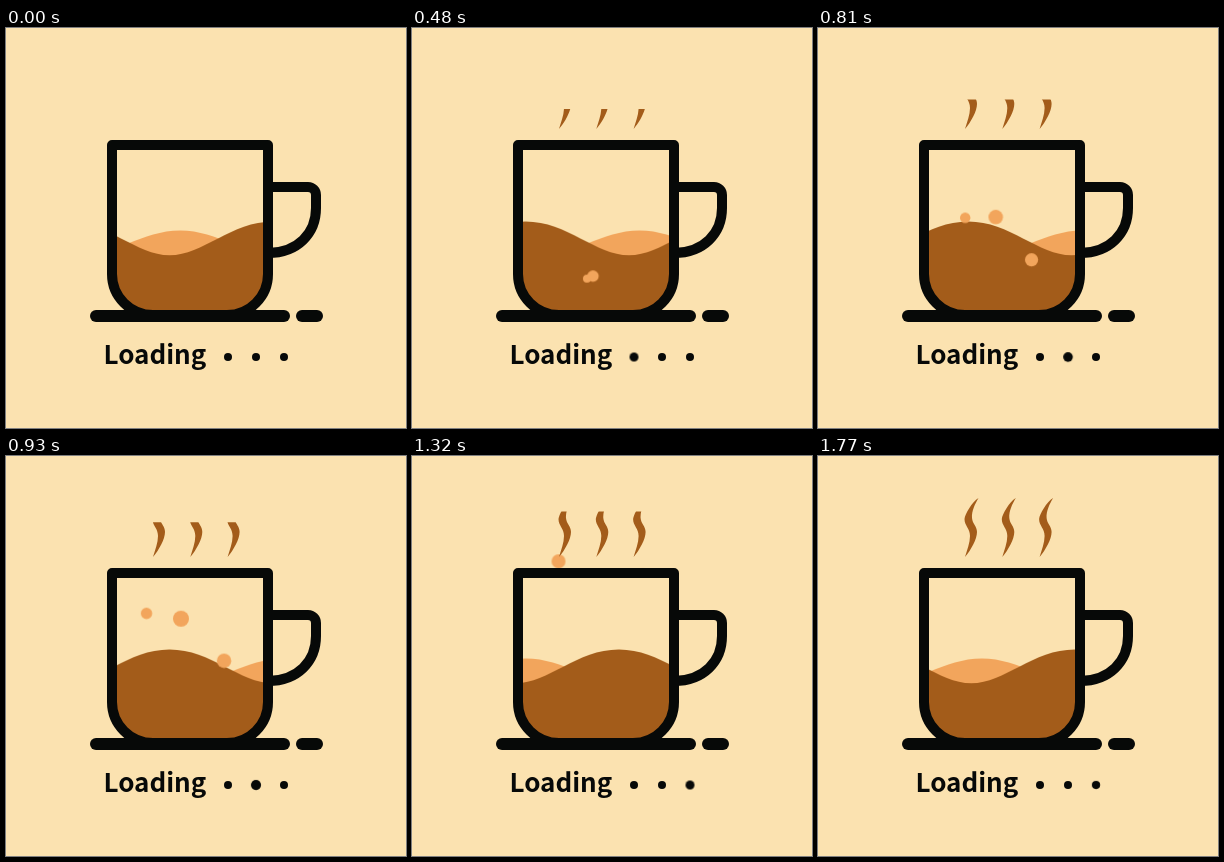
Animation, 400 px wide and 400 px high, one loop 1800 ms. Source, as an HTML page:

```html
<!DOCTYPE html>
<html lang="en">
<head>
<meta charset="utf-8">
<title>Loading</title>
<style>
  html, body { margin: 0; width: 100%; height: 100%; overflow: hidden; background: #fbe2b0; }
  svg { display: block; width: 100vw; height: 100vh; }
  .ink { fill: #070908; }
  .line { fill: none; stroke: #070908; stroke-width: 10; stroke-linejoin: round; }
  .coffee { fill: #a35c1a; }
  .foam { fill: #f2a55c; }
  text { font: 700 26px "Noto Sans CJK SC", "Noto Sans CJK JP", "Open Sans", sans-serif; }

  .wave, .reveal, .bubble, .dot, .burst { animation: 1800ms linear infinite; }
  .wave { animation-name: flow; }
  .reveal { animation-name: rise; }
  .dot { animation-name: pulse; transform-box: fill-box; transform-origin: center; }
  .burst { animation-name: pop; fill: none; stroke: #f2a55c; stroke-linecap: round; }
  .large { animation-name: large; }
  .small { animation-name: small; }
  .late { animation-name: late; }

  @keyframes flow { to { transform: translateX(200px); } }

  /* three steps up, each with a short rest */
  @keyframes rise {
    0% { transform: translateY(0); }
    25%, 33.33% { transform: translateY(-20px); }
    58.33%, 66.67% { transform: translateY(-40px); }
    91.67%, 100% { transform: translateY(-60px); }
  }
  @keyframes pulse {
    0%, 33.33%, 100% { transform: scale(1); }
    16.67% { transform: scale(1.3); }
  }
  @keyframes pop {
    0% { transform: scale(.4); stroke-width: 4px; }
    5% { transform: scale(1); stroke-width: 4px; }
    10%, 100% { transform: scale(1.3); stroke-width: 0; }
  }
  @keyframes large {
    0%, 11.5% { transform: translate(182px, 289px) scale(.35); }
    15% { transform: translate(181.5px, 281px) scale(.5); }
    38.33% { transform: translate(180.5px, 215.5px) scale(.65); }
    51.67% { transform: translate(175px, 163px) scale(.8); }
    61.66% { transform: translate(172px, 110px) scale(.85); }
    61.67%, 100% { transform: translate(172px, 110px) scale(0); }
  }
  @keyframes small {
    0%, 11% { transform: translate(198px, 288px) scale(.3); }
    15% { transform: translate(196px, 279px) scale(.32); }
    38.33% { transform: translate(154px, 222.5px) scale(.47); }
    51.67% { transform: translate(140.5px, 157.5px) scale(.57); }
    73.33% { transform: translate(146.5px, 105.5px) scale(.7); }
    74.99% { transform: translate(147px, 100px) scale(.7); }
    75%, 100% { transform: translate(147px, 100px) scale(0); }
  }
  @keyframes late {
    0%, 31% { transform: translate(203px, 288px) scale(.4); }
    38.33% { transform: translate(209px, 259px) scale(.6); }
    51.67% { transform: translate(218px, 205px) scale(.72); }
    73.33% { transform: translate(231px, 117px) scale(.48); }
    79.99% { transform: translate(240px, 91px) scale(.6); }
    80%, 100% { transform: translate(240px, 91px) scale(0); }
  }
</style>
</head>
<body>
<svg viewBox="0 0 400 400">
  <defs>
    <clipPath id="inside">
      <path d="M108 119H260V246A39 39 0 0 1 221 285H147A39 39 0 0 1 108 246Z"/>
    </clipPath>
    <clipPath id="shown">
      <rect class="reveal" x="130" y="101" width="120" height="62"/>
    </clipPath>
    <path id="wisp" d="M160.5 42C154 46 147 58 146.5 63C146.5 70 152 72 152 80C152 87 149 94 147 101C153 94 159 83 159 76C159 70 154.5 68 154 62C153.5 55 157 48 160.5 42Z"/>
    <path id="rays" d="M10 0h3M-10 0h-3M0 10v3M0-10v-3M7.1 7.1l2 2M-7.1 7.1l-2 2M7.1-7.1l2-2M-7.1-7.1l-2-2"/>
  </defs>

  <g clip-path="url(#inside)">
    <path class="wave foam" d="M-136.5 228.5C-99 228.5-71 202.5-33 202.5S33 228.5 70.5 228.5S136 202.5 174 202.5S240 228.5 277.5 228.5V290H-136.5Z"/>
    <path class="wave coffee" d="M-147 193.5C-105 193.5-77 227.3-43.5 227.3S18 193.5 60 193.5S130 227.3 163.5 227.3S225 193.5 267 193.5V290H-147Z"/>
  </g>

  <g class="foam">
    <circle class="bubble large" r="10"/>
    <circle class="bubble small" r="10"/>
    <circle class="bubble late" r="10"/>
  </g>
  <g transform="translate(172 106)"><use class="burst" href="#rays" style="animation-delay:-690ms"/></g>
  <g transform="translate(147 98)"><use class="burst" href="#rays" style="animation-delay:-450ms"/></g>
  <g transform="translate(240 90)"><use class="burst" href="#rays" style="animation-delay:-360ms"/></g>

  <g class="coffee" clip-path="url(#shown)">
    <use href="#wisp"/>
    <use href="#wisp" x="37.3"/>
    <use href="#wisp" x="74.6"/>
  </g>

  <path class="line" d="M262 159H302A8 8 0 0 1 310 167V180C310 205 292 225 262 225"/>
  <path class="line" d="M106 117H262V246A41 41 0 0 1 221 287H147A41 41 0 0 1 106 246Z"/>

  <g class="ink">
    <rect x="84" y="282" width="200" height="12" rx="6"/>
    <rect x="290" y="282" width="27" height="12" rx="6"/>
    <text x="97.5" y="335.5">Loading</text>
    <circle class="dot" cx="222" cy="329" r="4"/>
    <circle class="dot" cx="250" cy="329" r="4" style="animation-delay:-1200ms"/>
    <circle class="dot" cx="278" cy="329" r="4" style="animation-delay:-600ms"/>
  </g>
</svg>
</body>
</html>
```
